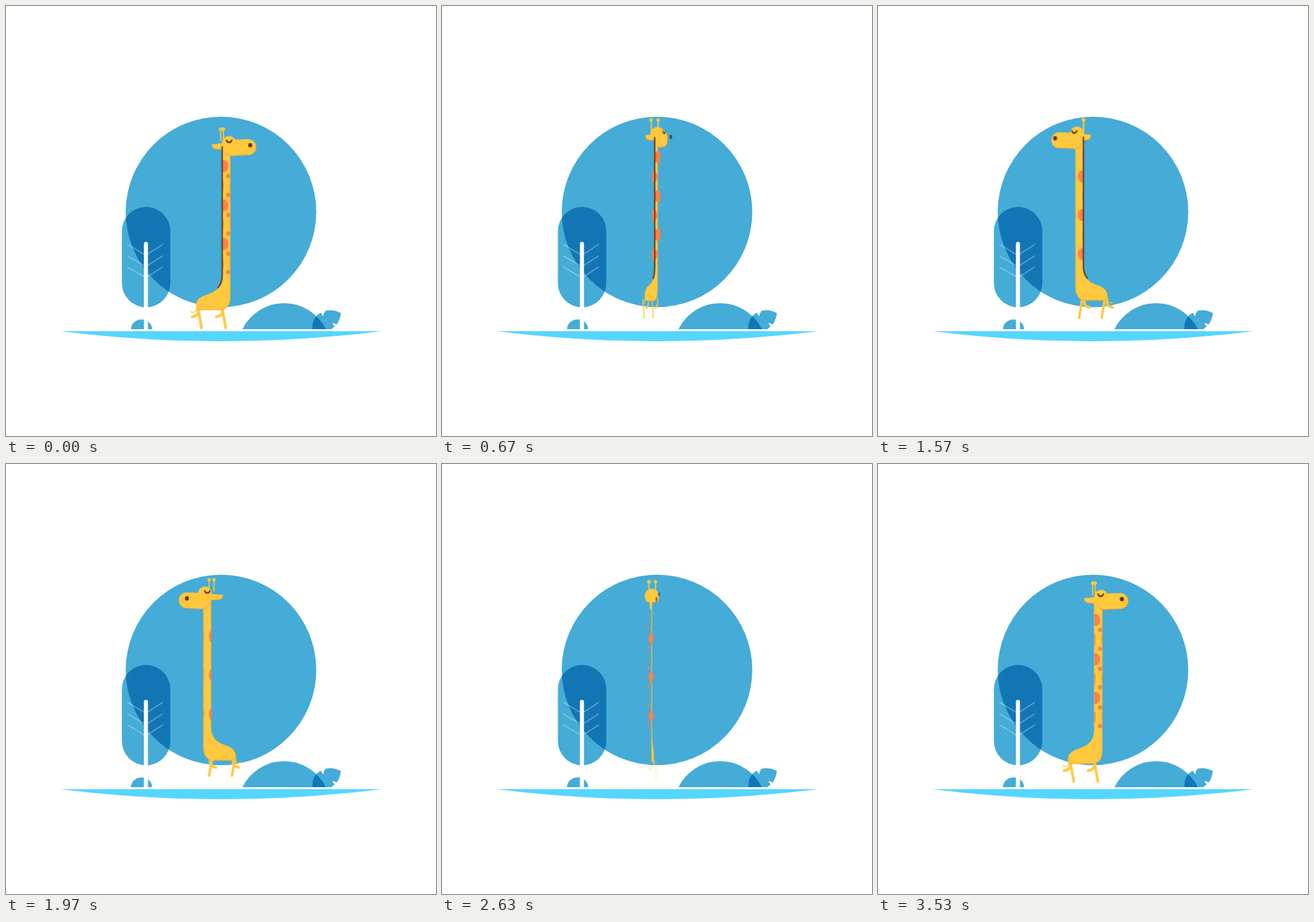
An HTML page without scripts that plays this animation: 640 by 640 pixels, repeating every 3.56 s.

```html
<!DOCTYPE html>
<html lang="en">
<head>
<meta charset="utf-8">
<title>Hopping giraffe</title>
<style>
  @property --turn { syntax: "<angle>"; inherits: true; initial-value: 0deg; }
  @property --leg { syntax: "<number>"; inherits: true; initial-value: 1; }

  html, body { margin: 0; width: 100%; height: 100%; overflow: hidden; background: #fff; }
  svg { display: block; width: 100%; height: 100%; }

  .sky { fill: #45abd7; }
  .deep { fill: #1276b5; }
  .line { fill: none; stroke-linecap: round; stroke-linejoin: round; vector-effect: non-scaling-stroke; }

  /* The giraffe turns about a vertical axis: x = along * cos + side * sin. */
  .giraffe {
    --c: cos(var(--turn));
    --s: sin(var(--turn));
    --head: calc(var(--turn) + 24deg);
    --hc: cos(var(--head));
    --hs: sin(var(--head));
    animation: turn 3560ms linear infinite, hop 445ms infinite, stretch 445ms linear infinite;
  }
  .left { --side: -1; }
  .right { --side: 1; }

  .flat { transform: scaleX(calc(var(--c) + .0004)); }
  .skin { fill: #ffc83d; stroke: #ffc83d; }
  .shade { fill: #f8a23a; stroke: #f8a23a; }
  .lit { transform: translate(-.4px, -1px) scaleX(calc(var(--c) + .0004)); }
  .torso { stroke-width: 12; }

  .muzzle { transform: translateY(calc(2px - 2px * var(--c))); }
  .muzzle .line { stroke-width: 23; }
  .crown { transform: translateX(calc(18.5px * var(--c))); }
  .horn { transform: translateX(calc(8px * var(--c) + 5.2px * var(--side) * var(--hs))); }
  .ear {
    transform: translateX(calc(12px * var(--c)))
      scaleX(calc(-3 * var(--hc) + 11 * var(--side) * var(--hs) - 12 * var(--c)));
  }
  .eye {
    opacity: calc(99 * var(--side) * var(--c));
    transform: translateX(calc(18.5px * var(--c) + 11px * var(--side) * var(--s)))
      scaleX(calc(.25 + .75 * var(--side) * var(--c)));
  }
  .nostril {
    opacity: calc(99 * var(--side) * var(--c));
    transform: translateX(calc(50px * var(--c) + 9px * var(--side) * var(--s)))
      scaleX(calc(.25 + .75 * var(--side) * var(--c)));
  }
  .mane { stroke: #5a2d14; stroke-width: 1.8; opacity: calc(99 * var(--s) + 1); }

  .neck { transform: translateX(calc(14.5px * var(--c))); }
  .spots { --u: calc(var(--at) - var(--turn)); fill: #ff8044; }
  .spots ellipse {
    cx: calc(6.2px * cos(var(--u)));
    rx: calc(var(--size) * max(0, sin(var(--u)) + var(--wrap)));
  }

  .limb {
    stroke-width: 4;
    transform: translateX(calc(var(--along) * var(--c) + 4.5px * var(--side) * var(--s)))
      scaleX(calc(var(--c) + .0004));
  }
  .stand { transform: translateY(450px) scaleY(var(--leg)); }
  .fold { transform: translateY(450px); }
  .front { --along: 8.5px; }
  .back { --along: -27.5px; }

  @keyframes turn { to { --turn: 360deg; } }
  @keyframes hop {
    0% { transform: translate(313.5px, 0); animation-timing-function: cubic-bezier(.3, .6, .65, 1); }
    22% { transform: translate(313.5px, 8.2px); animation-timing-function: cubic-bezier(.2, .6, .4, 1); }
    70% { transform: translate(313.5px, -15.3px); animation-timing-function: cubic-bezier(.4, 0, .7, .4); }
    100% { transform: translate(313.5px, 0); }
  }
  @keyframes stretch {
    0%, 100% { --leg: 1; }
    22% { --leg: .7; }
    31% { --leg: 1; }
    40% { --leg: .82; }
    53% { --leg: .96; }
    74% { --leg: .92; }
  }
</style>
</head>
<body>
<svg viewBox="0 0 640 640">
  <defs>
    <clipPath id="sun"><circle cx="320" cy="306.5" r="141.8"/></clipPath>
    <clipPath id="hill"><path d="M352 481A69 69 0 0 1 476 481Z"/></clipPath>
    <clipPath id="tube"><rect x="-6" y="200" width="12" height="230"/></clipPath>
    <rect id="crownTree" x="172.500" y="299" width="72" height="149.500" rx="36"/>
    <path id="leaf" d="M456 481Q455 464 468.500 456.500L472 462Q473 456 476 453.500Q487 451 498.500 457Q497 467 492.500 474L485.500 471.500L489 477L484.500 481Z"/>
    <path id="torso" d="M14.500 215V434Q14.500 446.500 5 446.500H-24.500Q-24 439 -12 436C2 432 14 422 14.500 405Z"/>
    <path id="snout" d="M47.500 210.500L22 211.500"/>
    <path id="straight" d="M0 0L5 29"/>
    <path id="bent" d="M0 0V7.500Q-3 11.500 -9 12.500"/>
    <g id="hornShape">
      <path class="line" d="M0 183V200" stroke-width="1.800"/>
      <circle cy="183" r="2.600" stroke="none"/>
    </g>
    <path id="earShape" d="M0 204L1 205.500Q.95 212.500 .6 212.500H0Z" stroke="none"/>
    <path id="lid" d="M-4 199.500Q-3 203 0 203T4 199.500" stroke="#5a2d14" stroke-width="1.900"/>
    <ellipse id="hole" cy="207" rx="3" ry="3.300" fill="#6b3210"/>
  </defs>

  <circle class="sky" cx="320" cy="306.500" r="141.800"/>
  <use href="#crownTree" class="sky"/>
  <use href="#crownTree" class="deep" clip-path="url(#sun)"/>
  <path class="line" d="M181 355L208 371L233 355M181 372L208 388L233 372M181 388.500L208 404.500L233 388.500" stroke="#fff" stroke-opacity=".3" stroke-width="1.700"/>
  <path class="sky" d="M186 481A15.700 14.500 0 0 1 217.500 481Z"/>
  <path d="M205.300 484V354a3 3 0 0 1 6 0V484Z" fill="#fff"/>
  <path class="sky" d="M352 481A69 69 0 0 1 476 481Z"/>
  <use href="#leaf" class="sky"/>
  <use href="#leaf" class="deep" clip-path="url(#hill)"/>
  <path d="M81 484H560Q320 514 81 484Z" fill="#55d6ff"/>

  <g class="giraffe">
    <g class="left skin">
      <g class="stand"><use href="#straight" class="line limb back"/><use href="#straight" class="line limb front"/></g>
    </g>
    <g class="right skin">
      <g class="fold"><use href="#bent" class="line limb back"/><use href="#bent" class="line limb front"/></g>
    </g>
    <path class="line flat" d="M-29 449Q-31 458 -38 455" stroke="#ffc83d" stroke-width="1.500"/>

    <g class="skin">
      <use href="#hornShape" class="horn left"/>
      <use href="#hornShape" class="horn right"/>
    </g>
    <g class="shade" transform="translate(0 1)">
      <use href="#earShape" class="ear left"/>
      <use href="#earShape" class="ear right"/>
    </g>
    <g class="skin">
      <use href="#earShape" class="ear left"/>
      <use href="#earShape" class="ear right"/>
    </g>

    <use href="#torso" class="shade torso flat" vector-effect="non-scaling-stroke" style="vector-effect:non-scaling-stroke;stroke-linejoin:round"/>
    <use href="#torso" class="skin torso lit" style="vector-effect:non-scaling-stroke;stroke-linejoin:round"/>

    <g class="neck">
      <g clip-path="url(#tube)">
        <g class="spots" style="--at:130deg;--size:4.6px;--wrap:.75">
          <ellipse cy="238" ry="9"/><ellipse cy="296.500" ry="9"/><ellipse cy="354" ry="9"/>
        </g>
        <g class="spots" style="--at:205deg;--size:4.6px;--wrap:.75">
          <ellipse cy="267.500" ry="9"/><ellipse cy="325" ry="9"/><ellipse cy="383" ry="9"/>
        </g>
        <g class="spots" style="--at:8deg;--size:3px;--wrap:.2">
          <ellipse cy="267.500" ry="8"/><ellipse cy="325" ry="8"/><ellipse cy="383" ry="8"/>
        </g>
        <g class="spots" style="--at:64deg;--size:2.5px;--wrap:.3">
          <ellipse cy="253" ry="3.200"/><ellipse cy="281" ry="3.200"/><ellipse cy="311" ry="3.200"/>
          <ellipse cy="338.500" ry="3.200"/><ellipse cy="368.500" ry="3.200"/><ellipse cy="396" ry="3.200"/>
        </g>
      </g>
    </g>

    <g class="muzzle">
      <use href="#snout" class="line shade flat"/>
      <use href="#snout" class="line skin lit"/>
    </g>
    <circle class="skin crown" cy="203.500" r="10.300" stroke="none" style="stroke:none"/>
    <use href="#lid" class="line eye left"/>
    <use href="#lid" class="line eye right"/>
    <g class="muzzle">
      <use href="#hole" class="nostril left"/>
      <use href="#hole" class="nostril right"/>
    </g>
    <path class="line mane flat" d="M8.300 209V402Q8.300 412 2 419"/>
  </g>
</svg>
</body>
</html>
```
